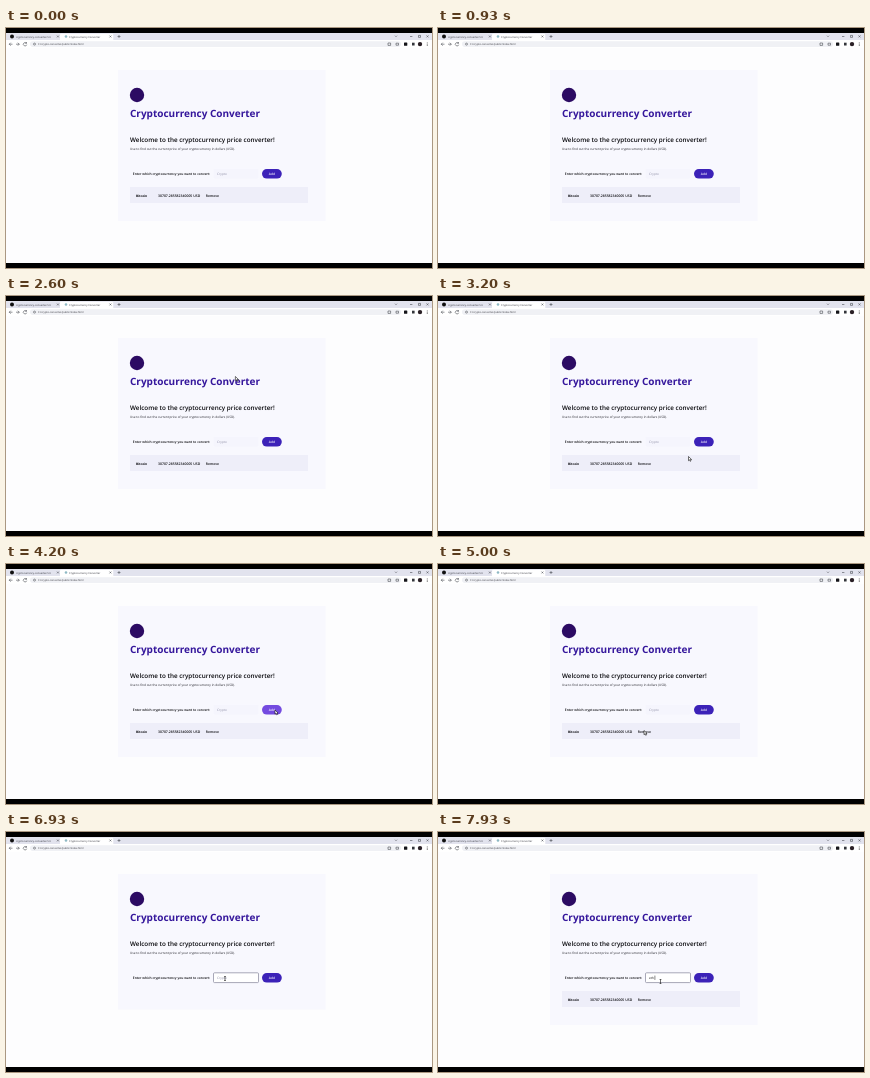
Animation of 426x240 px, one loop 8000 ms. Source, as an HTML page:

```html
<!DOCTYPE html>
<html lang="en">
<head>
<meta charset="utf-8">
<title>Cryptocurrency Converter</title>
<style>
  html, body { margin: 0; width: 100%; height: 100%; overflow: hidden; background: #000; }
  svg { display: block; width: 100vw; height: 100vh; }
  text { font-family: "Open Sans", "Noto Sans", sans-serif; text-rendering: geometricPrecision; fill: #08080c; }
  .semi { font-weight: 600; }
  .bold { font-weight: 700; }
  .tiny { font-size: 2.6px; fill: #33343c; }
  .icon { fill: none; stroke: #4b4d55; stroke-width: .6; }
</style>
</head>
<body>
<svg viewBox="0 0 426 240">
  <rect width="426" height="240"/>
  <rect y="5" width="426" height="230" fill="#fdfdfe"/>

  <!-- Browser tabs -->
  <rect y="5" width="426" height="7" fill="#e2e3ee"/>
  <path d="M54 12V7q0-1.3 1.3-1.3H106q1.3 0 1.3 1.3V12z" fill="#fff"/>
  <circle cx="6" cy="8.5" r="2" fill="#111"/>
  <text class="tiny" x="10" y="9.5">cryptocurrency-converter/src</text>
  <circle cx="60" cy="8.5" r="1.3" fill="#8fb9c4"/>
  <text class="tiny" x="63" y="9.5">Cryptocurrency Converter</text>
  <path class="icon" d="M51 7.6l1.8 1.8m0-1.8L51 9.4M103.5 7.6l1.8 1.8m0-1.8l-1.8 1.8M111.5 8.5h3m-1.5-1.5v3M389 7.7l1 1 1-1M404 8.5h2.4M412.5 7.4h2v2h-2zM420.5 7.4l2 2m0-2l-2 2"/>

  <!-- Browser toolbar -->
  <rect y="12" width="426" height="8" fill="#fff"/>
  <rect x="24" y="13.3" width="371" height="5.6" rx="2.8" fill="#f0f1f5"/>
  <path class="icon" d="M6.5 16.2H3.2m1.5-1.5l-1.5 1.5 1.5 1.5M10 16.2h3.3m-1.5-1.5l1.5 1.5-1.5 1.5M20.4 15.2a1.7 1.7 0 1 0 .3 1.5M20.5 14v1.3h-1.3M382 15h2.6v2.4H382zM390 15.2h2.5v2H390z"/>
  <circle cx="28.5" cy="16.1" r="1" class="icon"/>
  <text class="tiny" x="32" y="17.1">C:/crypto-converter/public/index.html</text>
  <rect x="398" y="14.4" width="3.3" height="3.4" rx=".6" fill="#15151a"/>
  <rect x="406" y="14.7" width="2.6" height="2.8" fill="#33353b"/>
  <circle cx="414" cy="16.1" r="2.2" fill="#2a2026"/>
  <path d="M421.3 14.5v3.5" stroke="#444" stroke-width=".8" stroke-dasharray=".8 .55"/>

  <!-- Page -->
  <rect id="card" x="112" y="42" width="207.5" height="151" fill="#f8f8fe"/>
  <circle cx="131" cy="67" r="7.2" fill="#2c0b63"/>
  <text class="bold" x="124" y="88.6" font-size="10" style="fill:#35179c">Cryptocurrency Converter</text>
  <text class="semi" x="124" y="114.2" font-size="6.3">Welcome to the cryptocurrency price converter!</text>
  <text x="124" y="122" font-size="3.15" style="fill:#22222a">Use to find out the current price of your cryptocurrency in dollars (USD).</text>
  <text class="semi" x="126.8" y="147" font-size="3.3">Enter which cryptocurrency you want to convert:</text>

  <rect id="field" x="207.5" y="140.8" width="45" height="9.8" rx="1"/>
  <text id="entry" x="211" y="146.9" font-size="3.2"></text>
  <path id="caret" d="M216.9 143.6v4.3" stroke="#111" stroke-width=".5"/>
  <rect id="button" x="256" y="141" width="19.8" height="9.6" rx="4.8"/>
  <text class="semi" x="265.9" y="147" font-size="3.2" text-anchor="middle" style="fill:#fff">Add</text>

  <g id="row" font-size="3.4" class="semi">
    <rect x="124" y="159" width="178" height="16" fill="#eeeef9"/>
    <text class="bold" x="130" y="168.5" font-size="3.2">Bitcoin</text>
    <text x="152" y="168.5" font-size="3.45">30707.285582340005 USD</text>
    <text x="199.8" y="168.5">Remove</text>
  </g>

  <path id="arrow" d="M0 0v4.2l1-.9.7 1.5.8-.4-.7-1.4h1.3z" fill="#fff" stroke="#111" stroke-width=".6"/>
  <path id="beam" d="M-.9-2h1.8M0-2v4M-.9 2H.9" fill="none" stroke="#111" stroke-width=".6"/>
</svg>
<script>
const LOOP = 8000, STEP = 200 / 3;
const $ = id => document.getElementById(id);

// Pointer stops: time, x, y
const path = [
  [0, 240, -8], [1400, 240, -8], [1933, 222, 52.5], [2300, 222, 52.5],
  [3200, 250.5, 160.5], [3700, 269, 146], [4300, 269, 146],
  [4800, 206, 166.5], [5200, 206, 166.5], [5867, 248, 46.5],
  [6200, 248, 46.5], [6733, 219, 146.5], [7300, 219, 146.5],
  [7800, 222.5, 149.5], [8000, 222.5, 149.5]
];

// Typed words: start, end, word
const typing = [[7000, 7330, "bitcoin"], [7600, 7860, "eth"]];
const REMOVED = 5067, ADDED = 7400, FOCUSED = 6800;

function pointerAt(t) {
  const i = path.findIndex(stop => stop[0] > t);
  const [t0, x0, y0] = path[i - 1], [t1, x1, y1] = path[i];
  const u = (t - t0) / (t1 - t0), ease = u * u * (3 - 2 * u);
  return [x0 + (x1 - x0) * ease, y0 + (y1 - y0) * ease];
}

function entryAt(t) {
  const active = typing.find(([start], i) => t >= start && t < (i ? LOOP : ADDED));
  if (!active) return "";
  const [start, end, word] = active;
  return word.slice(0, Math.ceil((t - start) / (end - start) * word.length));
}

const inside = (x, y, left, right) => x > left && x < right && y > 140.8 && y < 150.6;
const show = (id, visible) => $(id).setAttribute("visibility", visible ? "visible" : "hidden");

function draw(time) {
  const t = Math.floor((time % LOOP + 4) / STEP) * STEP % LOOP;
  const [x, y] = pointerAt(t);
  const hasRow = t < REMOVED || t >= ADDED;
  const focused = t >= FOCUSED;
  const entry = entryAt(t);
  const overField = inside(x, y, 207.5, 252.5);

  show("row", hasRow);
  $("card").setAttribute("height", hasRow ? 151 : 135.5);
  $("button").setAttribute("fill", inside(x, y, 256, 275.8) ? "#744be0" : "#3c22b8");

  $("field").setAttribute("fill", focused ? "#fff" : "#f5f5fd");
  $("field").setAttribute("stroke", focused ? "#85859a" : "none");
  $("field").setAttribute("stroke-width", .7);
  $("entry").textContent = entry || "Crypto";
  $("entry").style.fill = entry ? "#111" : "#9090a8";
  show("caret", entry === "eth");

  for (const id of ["arrow", "beam"]) $(id).setAttribute("transform", `translate(${x} ${y})`);
  show("arrow", !overField);
  show("beam", overField);
}

const began = performance.now();
(function frame() {
  draw(performance.now() - began);
  requestAnimationFrame(frame);
})();
</script>
</body>
</html>
```
